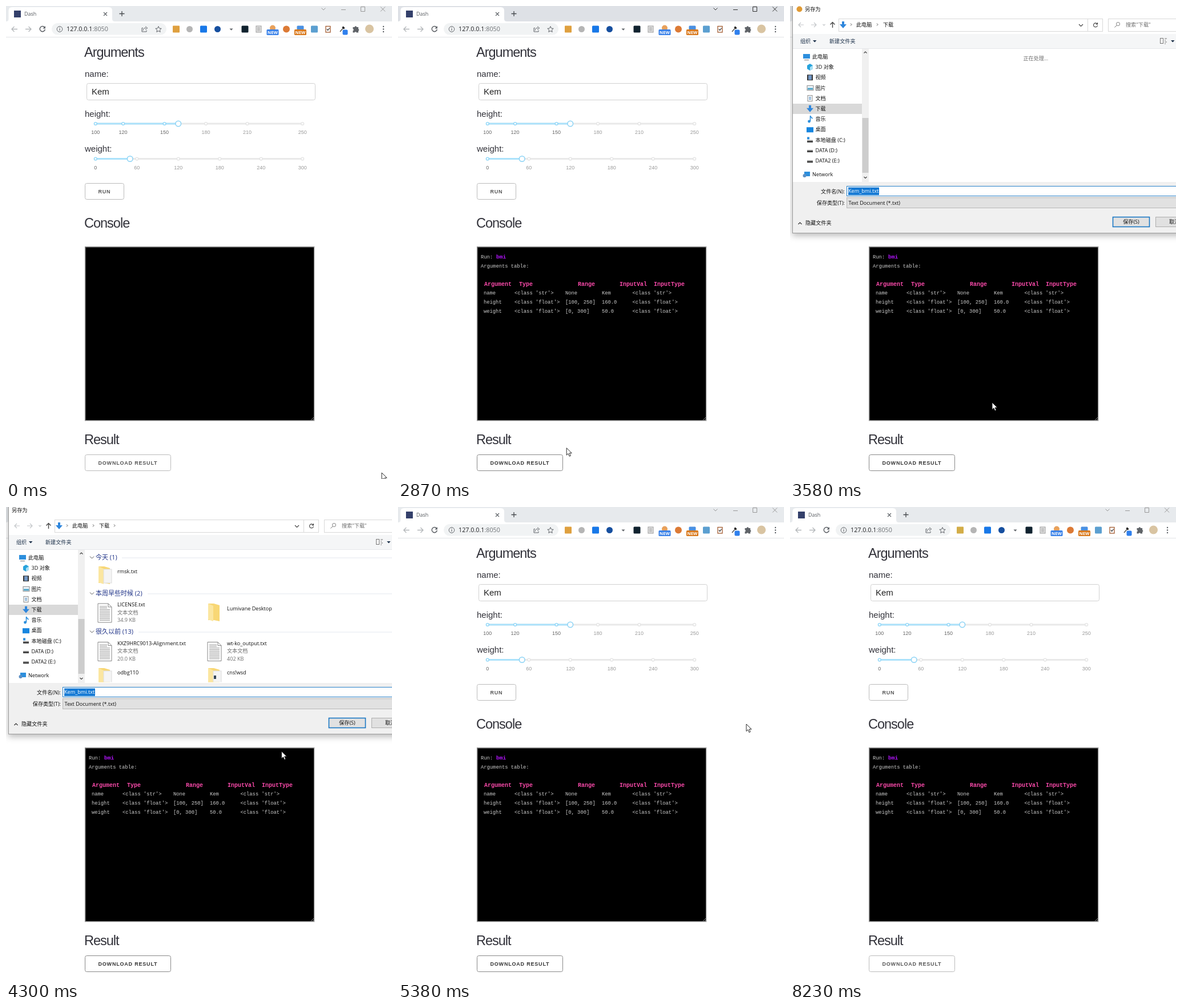
These frames come from a looping animation (676 by 828 pixels, 8300 ms). An HTML page:

```html
<!DOCTYPE html>
<html lang="en">
<head>
<meta charset="utf-8">
<title>Dash</title>
<style>
  html, body { margin: 0; width: 100%; height: 100%; overflow: hidden; background: #fff; }
  svg { display: block; width: 676px; height: 828px; }
  text { white-space: pre; }
  .ui { font-family: "Open Sans", "Noto Sans CJK SC", "Noto Sans CJK", sans-serif; }
  .page { font-family: "Liberation Sans", Arial, sans-serif; }
  .mono { font-family: "Liberation Mono", monospace; }
</style>
</head>
<body>
<svg id="stage" viewBox="0 0 676 828"></svg>
<script>
const LOOP = 8300;
const stage = document.getElementById('stage');

// Markup helpers
const esc = s => s.replace(/&/g, '&amp;').replace(/</g, '&lt;');
const rect = (x, y, w, h, fill, more = '') =>
  `<rect x="${x}" y="${y}" width="${w}" height="${h}" fill="${fill}" ${more}/>`;
const disc = (x, y, r, fill, more = '') => `<circle cx="${x}" cy="${y}" r="${r}" fill="${fill}" ${more}/>`;
const line = (d, color, w = 1, more = '') =>
  `<path d="${d}" fill="none" stroke="${color}" stroke-width="${w}" ${more}/>`;
const shape = (d, fill, more = '') => `<path d="${d}" fill="${fill}" ${more}/>`;
// y is the vertical centre of the capitals
const text = (cls, x, y, size, color, str, more = '') =>
  `<text class="${cls}" x="${x}" y="${y + size * 0.36}" font-size="${size}" fill="${color}" ${more}>${esc(str)}</text>`;
const ui = (x, y, str, color = '#111', size = 9.1, more = '') => text('ui', x, y, size, color, str, more);
const group = (id, body) => `<g id="${id}">${body}</g>`;

function browser() {
  const grey = '#5f6368';
  const nav =
    line('M20 40.5H10.5M14.5 36l-4.5 4.5 4.5 4.5M34 40.5h9.5M39.5 36l4.5 4.5-4.5 4.5', '#b4b7ba', 1.3) +
    line('M67.6 37.4A4.6 4.6 0 1 0 68.4 41', grey, 1.5) + shape('M69 35v4.6h-4.6z', grey) +
    rect(80, 30, 201, 20.5, '#f1f3f4', 'rx="10"') +
    disc(94, 40.5, 4.8, 'none', `stroke="${grey}"`) + line('M94 39.5v3.5M94 37.4v1.2', grey, 1.1) +
    ui(106, 40.4, '127.0.0.1:8050', '#202124', 10.75).replace(':8050', '<tspan fill="#6f7377">:8050</tspan>') +
    line('M240 38.5h-2v6.5h8v-2.5M240 43c0-3.5 2-4.6 5-4.6M244 35.8l3.8 2.8-3.8 2.8', grey) +
    line('M267 35.6l1.5 3.4 3.7.4-2.8 2.4.8 3.7-3.2-1.9-3.2 1.9.8-3.7-2.8-2.4 3.7-.4z', grey);
  const badge = (x, color) => rect(x, 41, 21, 10, color, 'rx="1.5"') +
    ui(x + 10.5, 46.2, 'NEW', '#fff', 7.6, 'font-weight="700" text-anchor="middle"');
  const square = (x, color) => rect(x - 6, 34.5, 12, 12, color, 'rx="1.5"');
  const extensions =
    rect(292, 34.5, 12, 12, '#dfa03f', 'id="saver" rx="1"') +
    disc(321.5, 40.5, 5.5, '#b5b5b5') + square(346, '#1878e8') + disc(370.5, 40.5, 5.5, '#164f9f') +
    shape('M391.5 39.5h6l-3 3.2z', grey) + square(418.5, '#10222f') +
    rect(438, 35, 9, 11, '#e3e3e3', 'stroke="#999"') + line('M440 38h5M440 40.5h5M440 43h5', '#999') +
    disc(467, 38.5, 5, '#e8a15c') + badge(456.5, '#3b82e8') + disc(491, 40.5, 6, '#dc7a35') +
    square(515.5, '#4a90e2') + badge(505, '#d97a1e') + square(540, '#5b9fd0') +
    rect(560, 35.5, 8, 10.5, '#fff', 'stroke="#a35d33" stroke-width="1.3"') +
    line('M562 40.5l1.7 2 3-4', '#333', 1.2) +
    line('M585 45l5.5-6.5', '#555', 1.5) + line('M589.5 36.5l3 3', '#111', 3) +
    rect(589.5, 41.5, 9, 9, '#2f80ed', 'rx="2"') +
    shape('M607.5 37h3a1.8 1.8 0 0 1 3.6 0h3v3.2a1.8 1.8 0 0 1 0 3.4v2.9h-3.4a1.7 1.7 0 0 0-3.3 0h-2.9v-3.2a1.7 1.7 0 0 0 0-3.3z', grey) +
    disc(636.5, 40, 7.5, '#d9c4a2') +
    [36, 40.5, 45].map(y => disc(661, y, 1.2, grey)).join('');
  return rect(0, 0, 676, 27, '#dee1e6', 'id="bar"') +
    shape('M0 27q4.5 0 4.5-4.5V8q0-6 6-6H180q6 0 6 6v14.5q0 4.5 4.5 4.5z', '#fff') +
    rect(0, 27, 676, 27.5, '#fff') + rect(0, 54, 676, 1, '#e2e4e7') +
    rect(14, 8, 12, 12, '#34406b') +
    ui(32, 14.2, 'Dash', '#565a5f', 9, 'id="title"') +
    line('M171 11l6 6m0-6l-6 6', grey, 1.2) + line('M198.5 13.5h9m-4.5-4.5v9', '#45494d', 1.3) +
    '<g id="controls" fill="none"><path d="M552.5 3.5l3.5 3.5 3.5-3.5M587 6.5h8M621.5 1.5h7v8h-7zM656 1.5l8 8m0-8l-8 8"/></g>' +
    nav + extensions;
}

function slider(y, min, max, value, marks) {
  const at = v => 156.8 + (v - min) / (max - min) * 362.4;
  const end = at(value);
  return rect(156, y - 1.5, 364, 3, '#e9e9e9', 'rx="1.5"') +
    rect(156, y - 1.5, end - 156, 3, '#abe2fb', 'rx="1.5"') +
    marks.map(v => {
      const on = v <= value;
      return disc(at(v), y, 2.4, '#fff', `stroke="${on ? '#8fd6f7' : '#e4e4e4'}" stroke-width="1.4"`) +
        text('page', at(v), y + 15, 9, on ? '#666' : '#9a9a9a', String(v), 'text-anchor="middle"');
    }).join('') +
    disc(end, y, 4.8, '#fff', 'stroke="#8bd3f5" stroke-width="1.5"');
}

const button = (id, y, w, label) => group(id,
  rect(138.5, y + .5, w, 28, '#fff', 'rx="3" stroke="#bbb"') +
  text('page', 161.5, y + 14.7, 9, '#555', label, 'font-weight="700" letter-spacing=".8"'));

function output() {
  const mono = (x, y, str) => text('mono', x, y, 8.8, '#ccc', str);
  const bold = (x, y, str, color, size = 10) => text('mono', x, y, size, color, str, 'font-weight="700"');
  const cols = [150, 204, 293, 357, 410.5];
  const rows = [
    ['name', "<class 'str'>", 'None', 'Kem', "<class 'str'>"],
    ['height', "<class 'float'>", '[100, 250]', '160.0', "<class 'float'>"],
    ['weight', "<class 'float'>", '[0, 300]', '50.0', "<class 'float'>"]
  ];
  const heads = [['Argument', 151], ['Type', 212], ['Range', 315], ['InputVal', 388], ['InputType', 448]];
  return mono(145, 438.5, 'Run:') + bold(172, 438.5, 'bmi', '#b414ff', 9.6) +
    mono(145, 454.5, 'Arguments table:') +
    heads.map(([s, x]) => bold(x, 486, s, '#f749a8')).join('') +
    rows.map((r, i) => r.map((s, c) => mono(cols[c], 502 + i * 16, s)).join('')).join('');
}

function page() {
  const head = (y, s) => text('page', 137, y, 23.5, '#32323a', s, 'letter-spacing="-1"');
  const label = (y, s) => text('page', 138, y, 15, '#32323a', s);
  return head(81, 'Arguments') + label(118.6, 'name:') +
    rect(141.5, 135.5, 400, 29, '#fff', 'rx="3" stroke="#d1d1d1"') +
    text('page', 150, 149.8, 15, '#222', 'Kem') +
    label(188.5, 'height:') + slider(206, 100, 250, 160, [100, 120, 150, 180, 210, 250]) +
    label(250, 'weight:') + slider(267.5, 0, 300, 50, [0, 60, 120, 180, 240, 300]) +
    button('run', 310, 68, 'RUN') + head(380, 'Console') +
    rect(138, 421, 402.5, 305.5, '#b4b4b4') + shape('M138 421h402.5l-1.5 1.5H139.5v302.5l-1.5 1.5z', '#858585') +
    rect(139.5, 422.5, 399.7, 302.7, '#000') + line('M534 725l5-5m-2 5l2-2', '#aaa', .8) +
    group('output', output()) +
    head(759, 'Result') + button('download', 785, 150, 'DOWNLOAD RESULT');
}

// Small generic icons of the file dialog
const downArrow = (x, y) => shape(`M${x - 2} ${y - 6}h4v5h4l-6 7-6-7h4z`, '#2f86dc');
const drive = (x, y) => rect(x - 5, y, 10, 3.5, '#444') + rect(x - 5, y - 1, 10, 1.5, '#bbb');
const folder = (x, y) => shape(`M${x} ${y}h10l10 3v28l-10-2H${x}z`, '#f8d775') +
  shape(`M${x} ${y}l9 4v27l-9-3z`, '#fbe6a0');
const fullFolder = (x, y) => folder(x, y) + rect(x + 9, y + 5, 14, 24, '#f4f4f4', 'stroke="#ddd"');
function sheet(x, y) {
  let d = '';
  for (let i = 0; i < 10; i++) d += `M${x + 3} ${y + 5 + i * 2.7}h${i < 2 ? 13 : 18}`;
  return shape(`M${x} ${y}h18l6 6v27H${x}z`, '#fff', 'stroke="#888"') + line(d, '#888', .9) +
    line(`M${x + 18} ${y}v6h6`, '#888');
}

function files() {
  const section = (y, s, x) => line(`M147 ${y - 2}l3.5 3.5 3.5-3.5`, '#555') +
    ui(157, y, s, '#1e3287', 11) + rect(x, y, 676 - x, 1, '#e3e7ef');
  const doc = (x, y, name, size) => sheet(x, y - 2) + ui(x + 34, y, name) +
    ui(x + 34, y + 13.5, '文本文档', '#6d6d6d') + ui(x + 34, y + 27, size, '#6d6d6d');
  return line('M189 30.5l2 2-2 2', '#555') +
    section(88.5, '今天 (1)', 203) + fullFolder(162, 104) + ui(195, 113, 'rmsk.txt') +
    section(151.5, '本周早些时候 (2)', 248) + doc(161, 171, 'LICENSE.txt', '34.9 KB') +
    folder(354, 169) + ui(387, 178, 'Lumivane Desktop') +
    section(218.5, '很久以前 (13)', 232) + doc(161, 238.5, 'KXZ9HRC9013-Alignment.txt', '20.0 KB') +
    doc(353, 238.5, 'wt-ko_output.txt', '402 KB') +
    `<g clip-path="url(#list)">${fullFolder(162, 282)}${fullFolder(354, 282)}${rect(364, 295, 4, 6, '#345')}</g>` +
    ui(195, 290, 'odbg110') + ui(387, 290, 'cns!wsd');
}

function dialog() {
  const blue = '#2d8fdd';
  const names = ['3D 对象', '视频', '图片', '文档', '下载', '音乐', '桌面', '本地磁盘 (C:)', 'DATA (D:)', 'DATA2 (E:)'];
  const icons = [
    (x, y) => shape(`M${x} ${y - 6}l5 3v6l-5 3-5-3v-6z`, '#27a3dc') + shape(`M${x} ${y}l5-3v6l-5 3z`, '#a8e0f5'),
    (x, y) => rect(x - 5, y - 5, 10, 10, '#333') + rect(x - 3, y - 4, 6, 8, '#7196c4'),
    (x, y) => rect(x - 5, y - 4, 11, 8, '#eef6fb', 'stroke="#888"') + rect(x - 4, y, 9, 3, '#4fa5c9'),
    (x, y) => rect(x - 4, y - 5, 8, 10, '#fff', 'stroke="#888"') + line(`M${x - 2} ${y - 2}h4m-4 2h4m-4 2h4`, '#4a87bd'),
    downArrow,
    (x, y) => disc(x - 1.5, y + 4, 2.4, blue) + line(`M${x + .5} ${y + 4}v-10q1 3 4 5`, blue, 1.6),
    (x, y) => rect(x - 6, y - 4, 12, 9, '#1686e0'),
    (x, y) => drive(x, y + 1) + rect(x - 5, y - 5, 4, 4, blue),
    drive, drive
  ];
  const tree = rect(5, 171, 121, 18, '#d9d9d9') +
    rect(23, 84, 12, 8, blue) + line('M25 94.5h8', '#777') + ui(39, 89, '此电脑') +
    names.map((s, i) => icons[i](35, 107 + i * 18.2) + ui(44.5, 107 + i * 18.2, s)).join('') +
    rect(25, 290, 10, 8, blue) + disc(25.5, 297, 3, '#5c8fc4') + ui(39, 295, 'Network');
  const scroll = rect(126, 75, 12, 233, '#f0f0f0') + rect(126.5, 196, 11, 96, '#cdcdcd') +
    line('M129.5 82.5l2.5-2.5 2.5 2.5M129.5 299l2.5 2.5 2.5-2.5', '#444', 1.2);
  const address = line('M24 33H15m4-4l-4 4 4 4M37 33h9m-4-4l4 4-4 4M57.5 32l2 2 2-2', '#c3c6c9', 1.2) +
    line('M74.5 38V28.5m-4 4l4-4 4 4', '#444', 1.4) +
    rect(85.5, 22.5, 462, 22, '#fff', 'stroke="#d9d9d9"') + rect(521, 23, 1, 21, '#d9d9d9') +
    downArrow(93, 33) + line('M106 30.5l2 2-2 2M152 30.5l2 2-2 2', '#555') +
    ui(116, 32.5, '此电脑') + ui(163, 32.5, '下载') + line('M506 32l3.5 3.5L513 32', '#444', 1.2) +
    line('M538 31.5a3.5 3.5 0 1 0 .5 2.5M538.5 29v3h-3', '#444', 1.1) +
    rect(557.5, 22.5, 125, 22, '#fff', 'stroke="#d9d9d9"') +
    disc(574.5, 31.5, 3, 'none', 'stroke="#777"') + line('M572 34l-3.5 3.5', '#777') +
    ui(588, 33, '搜索"下载"', '#6d6d6d');
  const tools = rect(5, 49, 671, 25.5, '#f5f6f7') + rect(5, 74, 671, 1, '#e5e7ea') +
    ui(18, 61.5, '组织', '#1c3049') + shape('M40 60h6.5l-3.2 3.5zM667 60h6.5l-3.2 3.5z', '#1c3049') +
    ui(69, 61.5, '新建文件夹', '#1c3049') +
    rect(648.5, 56.5, 5, 9, '#fff', 'stroke="#777"') + line('M656 57h4m-4 3h2m-2 3h4m-4 3h2', '#777');
  const form = rect(5, 308, 671, 89, '#f0f0f0') +
    ui(96, 324.5, '文件名(N):', '#111', 9.1, 'text-anchor="end"') +
    rect(99.5, 315.5, 590, 17, '#fff', 'stroke="#2a82c9"') + rect(102, 317.5, 54, 13.5, '#1479d4') +
    ui(102, 324.2, 'Kem_bmi.txt', '#fff') +
    ui(96, 345, '保存类型(T):', '#111', 9.1, 'text-anchor="end"') +
    rect(99.5, 335.5, 590, 18, '#e1e1e1', 'stroke="#b8b8b8"') + ui(102.5, 345, 'Text Document (*.txt)') +
    line('M14.5 382l3-3 3 3', '#333', 1.2) + ui(27, 380, '隐藏文件夹') +
    rect(565.5, 369.5, 64, 17, '#e1e1e1', 'id="save" stroke="#1977c4"') +
    ui(597.5, 378, '保存(S)', '#111', 9.1, 'text-anchor="middle"') +
    rect(640.5, 369.5, 64, 17, '#e1e1e1', 'stroke="#adadad"') + ui(664, 378, '取消');
  return rect(4.5, -10, 690, 407.5, '#fff', 'stroke="#9a9a9a" filter="url(#shadow)"') +
    address + tools + tree + scroll + form +
    ui(26, 5.5, '另存为', '#111', 9.2, 'id="caption"') +
    group('busy', disc(16.5, 5.5, 5, '#e09a34') + ui(408.5, 92, '正在处理...', '#6d6d6d')) +
    group('files', files());
}

stage.innerHTML =
  `<defs><clipPath id="list"><rect x="139" y="75" width="537" height="231.5"/></clipPath>
   <filter id="shadow" x="-10%" y="-10%" width="120%" height="125%"><feDropShadow dx="0" dy="4" stdDeviation="6" flood-opacity=".28"/></filter></defs>` +
  rect(0, 0, 676, 828, '#fff') + browser() + page() + group('dialog', dialog()) +
  group('cursor', shape('M0 0v12.5l2.9-2.7 2 4.7 2.2-.9-2-4.6h4z', '#fff', 'stroke="#111" stroke-width=".9"'));

// Pointer track: time, x, y
const track = [
  [70, 658, 817], [200, 610, 760], [400, 420, 540], [600, 240, 372], [760, 192, 336], [860, 190, 333],
  [1200, 190, 333], [1400, 235, 470], [1600, 308, 640], [1750, 321, 715], [1900, 300, 760], [2010, 279, 774],
  [2210, 277, 794], [2540, 277, 794], [2700, 284, 787], [2870, 295, 774], [3050, 334, 725], [3200, 354, 694],
  [3620, 354, 694], [3850, 378, 590], [4050, 410, 470], [4170, 430, 436], [4230, 440, 434], [4480, 590, 412],
  [4700, 645, 397], [4840, 636, 390], [4980, 616, 382], [5040, 610, 380], [6510, 610, 380], [6600, 664, 404],
  [6650, 700, 412], [7639, 700, 412], [7640, 541, 650], [7910, 493, 830]
];

const el = Object.fromEntries([...stage.querySelectorAll('[id]')].map(n => [n.id, n]));
const within = (t, a, b) => t >= a && t < b;
const clamp = v => Math.max(0, Math.min(1, v));
const show = (node, on) => { node.style.display = on ? '' : 'none'; };
const fill = (node, color) => node.setAttribute('fill', color);

function pointer(t) {
  const i = track.findIndex(k => k[0] > t);
  if (i <= 0) return track[i < 0 ? track.length - 1 : 0].slice(1);
  const [a, b] = [track[i - 1], track[i]];
  const p = (t - a[0]) / (b[0] - a[0]);
  return [1, 2].map(n => a[n] + (b[n] - a[n]) * p);
}

function highlight(node, on) {
  node.firstChild.setAttribute('stroke', on ? '#888' : '#bbb');
  fill(node.lastChild, on ? '#333' : '#555');
}

function render(t) {
  const active = within(t, 800, 3140) || within(t, 5400, 8230);
  const loaded = t >= 3610;
  const hover = t >= 4980;
  const alpha = clamp((t - 3330) / 140) * clamp((5370 - t) / 130);
  fill(el.bar, active ? '#dee1e6' : '#e7eaed');
  el.controls.setAttribute('stroke', active ? '#333' : '#999');
  el.title.textContent = within(t, 940, 1000) || within(t, 2540, 2620) ? 'Updating...' : 'Dash';
  fill(el.saver, t >= 6110 ? '#d3ad48' : '#dfa03f');
  highlight(el.run, within(t, 680, 1230));
  highlight(el.download, within(t, 2080, 8230));
  show(el.output, t >= 940);

  el.dialog.setAttribute('opacity', alpha);
  show(el.dialog, alpha > 0);
  el.caption.setAttribute('x', loaded ? 10 : 26);
  show(el.busy, !loaded);
  show(el.files, loaded);
  fill(el.save, hover ? '#cce4f7' : '#e1e1e1');
  el.save.setAttribute('stroke-width', hover ? 1 : 1.6);

  const [x, y] = pointer(t);
  el.cursor.setAttribute('transform', `translate(${x.toFixed(1)} ${y.toFixed(1)})`);
}

const start = performance.now();
function tick() {
  render((performance.now() - start) % LOOP);
  requestAnimationFrame(tick);
}
tick();
</script>
</body>
</html>
```
